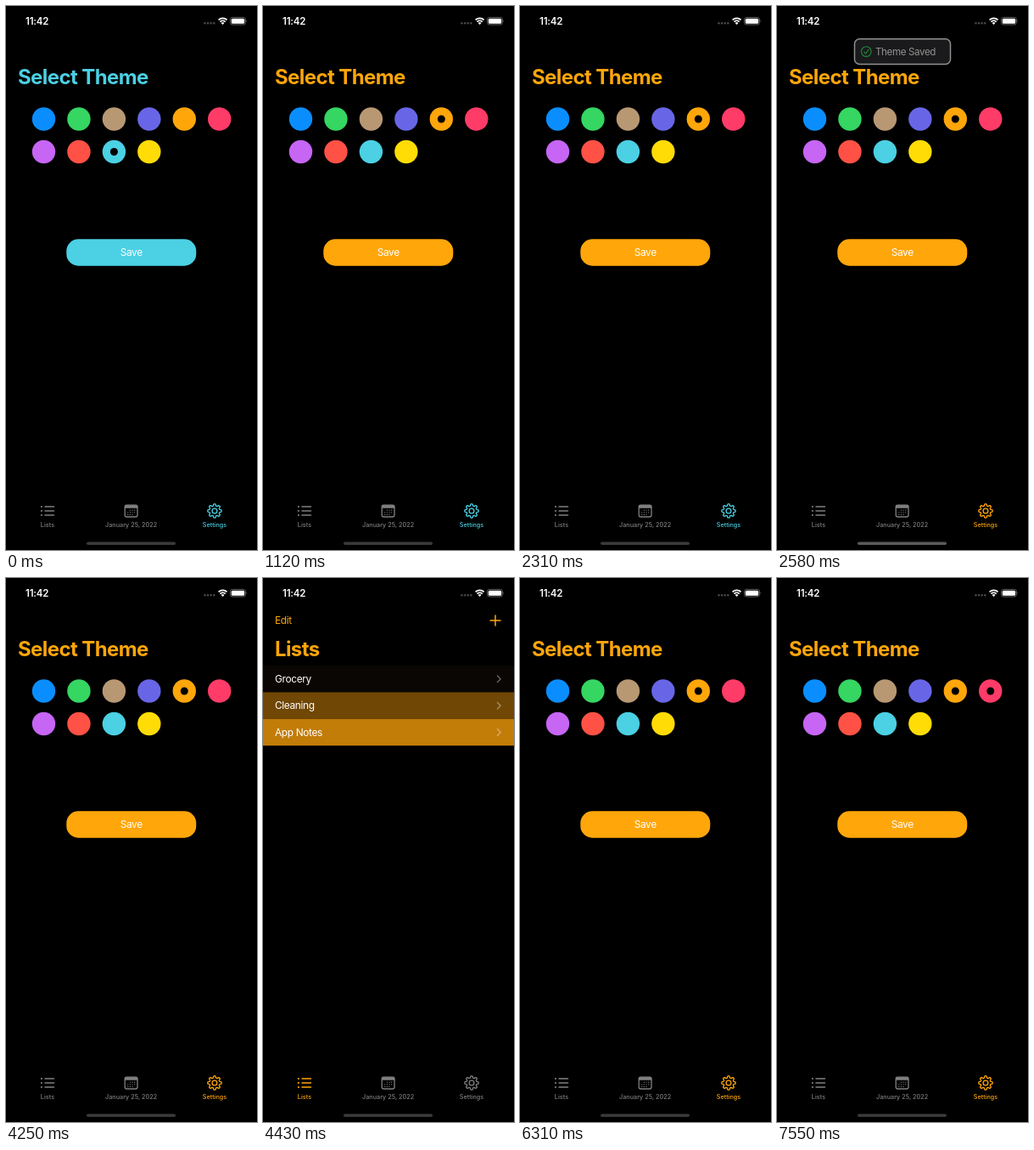
Animation of 296 by 640 pixels, one loop 8 s. Source, as an HTML page:

```html
<!DOCTYPE html>
<html lang="en">
<head>
<meta charset="utf-8">
<title>Theme picker</title>
<style>
  html, body { margin: 0; width: 100%; height: 100%; overflow: hidden; background: #000; }
  svg { display: block; width: 296px; height: 640px; font-family: Inter, sans-serif; }
  text { fill: #fff; font-size: 11.9px; letter-spacing: -.03em; }
  .title { font-size: 24px; font-weight: 700; letter-spacing: -.025em; }
  .themed { fill: var(--theme); }
  .line { fill: none; stroke: currentColor; stroke-linecap: round; stroke-linejoin: round; }
  .tab { color: #808080; }
  .tab text { fill: currentColor; font-size: 7.15px; font-weight: 500; letter-spacing: .01em; text-anchor: middle; }
  .tab.active { color: var(--tab); }
  .mid { text-anchor: middle; }
</style>
</head>
<body>
<svg id="stage" viewBox="0 0 296 640">
  <rect width="296" height="640"/>

  <g id="status" fill="#fff">
    <text x="23" y="22" font-weight="600" style="font-size:11.5px;letter-spacing:-.02em">11:42</text>
    <path d="M234.5 20.2h11" stroke="#4a4a4c" stroke-width="2.6" stroke-linecap="round" stroke-dasharray="0 3.6"/>
    <g color="#fff" stroke-width="1.7">
      <path class="line" style="stroke-linecap:butt" d="M250.6 16.4a7.2 7.2 0 0 1 10 0M252.5 18.6a4.5 4.5 0 0 1 6.2 0"/>
      <path d="M255.6 22l-1.9-2a2.8 2.8 0 0 1 3.8 0z"/>
    </g>
    <rect x="264.5" y="13.4" width="18" height="8.6" rx="2.6" fill="none" stroke="#777" stroke-width=".8"/>
    <rect x="265.8" y="14.7" width="15.4" height="6" rx="1.5"/>
    <path d="M283.6 16.2q1.3 1.5 0 3z" fill="#777"/>
  </g>

  <g id="settings">
    <text class="title themed" x="14" y="92">Select Theme</text>
    <g id="swatches"></g>
    <rect class="themed" x="71.3" y="274.3" width="153" height="31.4" rx="14"/>
    <text class="mid" x="147.7" y="294.2">Save</text>
  </g>

  <g id="lists">
    <text class="themed" x="14" y="54.3">Edit</text>
    <path d="M268 50h12M274 44v12" stroke="var(--theme)" stroke-width="1.5" stroke-linecap="round"/>
    <text class="title themed" x="14" y="92">Lists</text>
    <g id="rows"></g>
  </g>

  <g id="toast">
    <rect x="-58.2" y="-15.3" width="116.4" height="30.6" rx="6" fill="#2a2a2c" stroke="#e2e2e4" stroke-width="1.5"/>
    <g color="#30d158" stroke-width="1.2">
      <circle class="line" cx="-44" r="6"/>
      <path class="line" d="M-46.6 .4l1.9 2.3 3.4-5"/>
    </g>
    <text x="-33" y="4.4" style="fill:#e4e4e4">Theme Saved</text>
  </g>

  <g id="listsTab" class="tab">
    <path class="line" stroke-width="1.4" d="M46 589h10.5M46 594h10.5M46 599h10.5"/>
    <path class="line" stroke-width="2.2" d="M41.9 589h0M41.9 594h0M41.9 599h0"/>
    <text x="49" y="612.8">Lists</text>
  </g>
  <g class="tab">
    <rect class="line" x="140.2" y="587.2" width="14.8" height="13.8" rx="2.2" stroke-width="1.3"/>
    <path d="M140 590.8v-1.6q0-2 2-2h11.200q2 0 2 2v1.600z" fill="currentColor"/>
    <path class="line" stroke-width="1.3" stroke-dasharray="0 2.6" d="M146.4 593.200h6M143.800 595.800h8.500M143.800 598.400h6"/>
    <text x="147.600" y="612.8">January 25, 2022</text>
  </g>
  <g id="settingsTab" class="tab">
    <path id="gear" class="line" stroke-width="1.3" transform="translate(246 594)"/>
    <circle class="line" cx="246" cy="594" r="2.9" stroke-width="1.3"/>
    <text x="246" y="612.8">Settings</text>
  </g>
  <rect id="homeBar" x="95" y="630.4" width="105" height="3.6" rx="1.8"/>
</svg>

<script>
const $ = id => document.getElementById(id);
const CYAN = '#4bd0e4', ORANGE = '#ffa60a';
const colors = ['#0a8eff', '#35d661', '#b89873', '#6866e6', ORANGE, '#ff3b68',
                '#c765f5', '#ff5145', CYAN, '#ffdc05'];
const rows = [['Grocery', '#0a0603'], ['Cleaning', '#704704'], ['App Notes', '#c27c08']];

$('swatches').innerHTML = colors.map((color, i) => {
  const at = `cx="${44.5 + i % 6 * 41.45}" cy="${i < 6 ? 133 : 171.5}"`;
  return `<circle ${at} r="13.7" fill="${color}"/><circle class="hole" ${at} r="4.5"/>`;
}).join('');
const holes = document.querySelectorAll('.hole');

$('rows').innerHTML = rows.map(([name, color], i) => {
  const y = 103 + i * 31.4;
  return `<rect y="${y}" width="296" height="31.4" fill="${color}"/>
    <text x="14" y="${y + 20}">${name}</text>
    <path class="line" color="#fff" opacity=".38" stroke-width="1.4" d="M276.400 ${y + 12}l3.800 3.800-3.800 3.800"/>`;
}).join('');

// Eight rounded teeth: a circle whose radius follows a flattened cosine.
$('gear').setAttribute('d', 'M' + Array.from({ length: 96 }, (_, i) => {
  const a = i / 96 * 2 * Math.PI;
  const r = 7.1 + 1.1 * Math.tanh(2.5 * Math.cos(8 * a));
  return `${(r * Math.cos(a)).toFixed(2)} ${(r * Math.sin(a)).toFixed(2)}`;
}).join('L') + 'Z');

const show = (el, on) => { el.style.display = on ? '' : 'none'; };
const fifths = (t, start, step) => Math.min(1, (Math.floor((t - start) / step) + 1) / 5);

function toastOpacity(t) {
  if (t < 2480 || t >= 4030) return 0;
  if (t < 3580) return 1 - (1 - fifths(t, 2470, 110)) ** 2;
  return (1 - fifths(t, 3580, 112)) ** 2;
}

function draw(t) {
  const onLists = t >= 4430 && t < 6310;
  const themeColor = t < 1120 ? CYAN : ORANGE;
  $('stage').style.setProperty('--theme', themeColor);
  $('stage').style.setProperty('--tab', t < 2480 ? CYAN : ORANGE);

  show($('lists'), onLists);
  show($('settings'), !onLists);
  $('listsTab').classList.toggle('active', onLists);
  $('settingsTab').classList.toggle('active', !onLists);
  holes.forEach((hole, i) => show(hole, colors[i] === themeColor || (i === 5 && t >= 7550)));

  const opacity = toastOpacity(t);
  $('toast').setAttribute('opacity', opacity);
  $('toast').setAttribute('transform', `translate(148 53.600) scale(${0.92 + 0.08 * opacity})`);
  $('homeBar').setAttribute('fill', t >= 2480 && t < 4250 ? '#5a5a5a' : '#3a3a3a');
}

function tick() {
  draw(performance.now() % 8000);
  requestAnimationFrame(tick);
}
tick();
</script>
</body>
</html>
```
